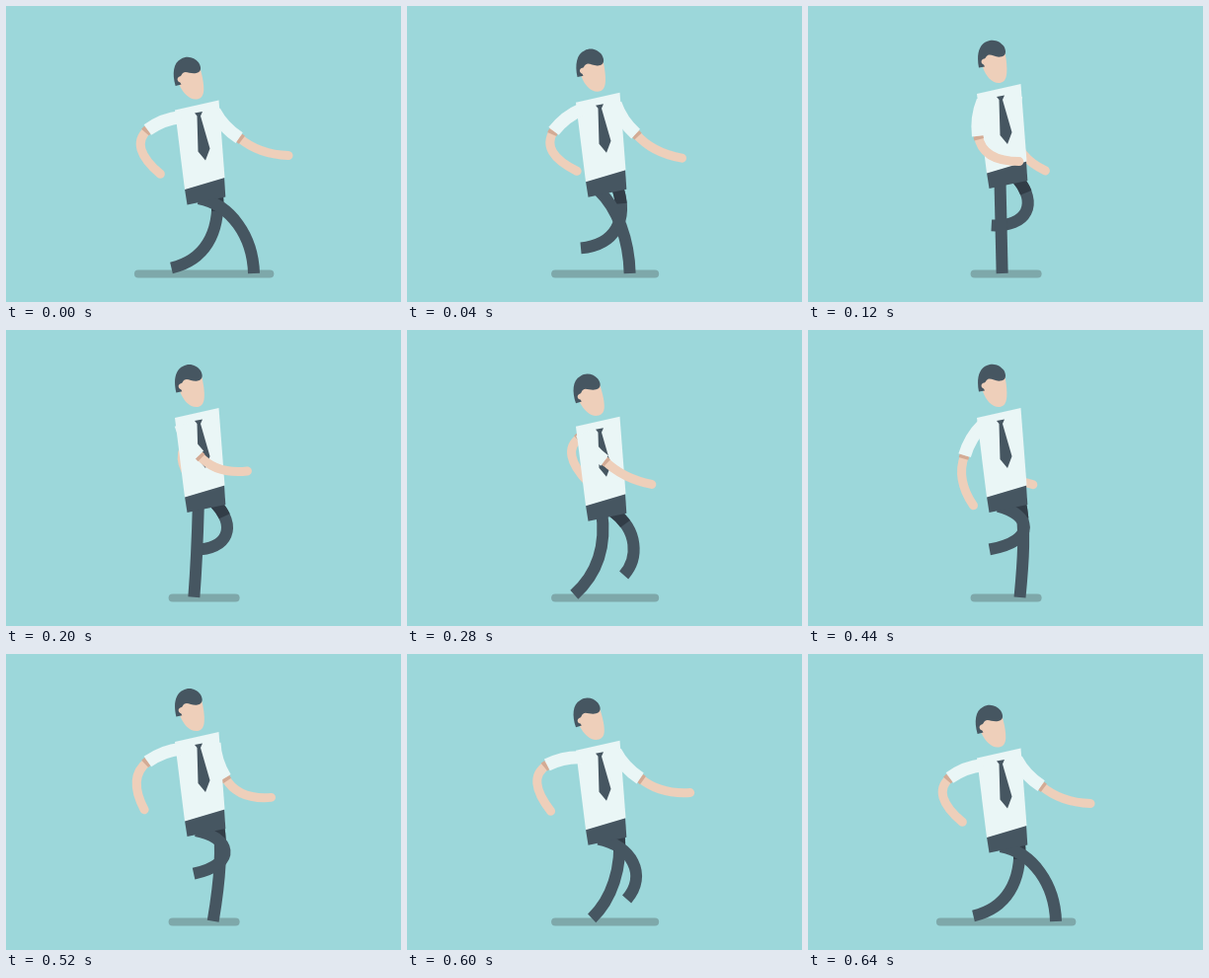
Recreate the animation shown at these times as an HTML page. Size 400 by 300 pixels, loop 680 ms.

```html
<!DOCTYPE html>
<html lang="en">
<head>
<meta charset="utf-8">
<title>Walking man</title>
<style>
  html, body { margin: 0; width: 100%; height: 100%; overflow: hidden; background: #9cd7da; }
  svg { display: block; width: 100%; height: 100%; }
  path { fill: none; }
  .leg { stroke: #465661; stroke-width: 12; }
  .shade { stroke: #323d47; stroke-width: 12; stroke-dasharray: 18 999; }
  .sleeve { stroke: #eaf6f6; stroke-width: 13; }
  .skin { stroke: #eecfba; stroke-width: 9; stroke-linecap: round; }
  .cuff { stroke: #d3ab95; stroke-width: 10; stroke-dasharray: 3.5 999; }
  .dark { fill: #465661; }
  .face { fill: #eecfba; }
  .shirt { fill: #eaf6f6; }
</style>
</head>
<body>
<svg viewBox="0 0 400 300">
  <rect width="400" height="300" fill="#9cd7da"/>
  <rect id="shadow" y="267.5" height="8" rx="4" fill="#7ea8aa"/>
  <path id="farLeg" class="leg"/>
  <path id="farShade" class="shade"/>
  <path id="nearLeg" class="leg"/>
  <g id="body">
    <g id="farArm"></g>
    <path class="dark" d="M181 169L221 157L222.3 177L183.5 185Z"/>
    <path class="shirt" d="M171 89L215.5 79L221.5 157.5L181 169.5Z"/>
    <path class="dark" d="M191 92L199 90.5L197 95L206.5 128L202 140L194.5 131L193.5 95Z"/>
    <g id="head">
      <path class="face" d="M177 50L199 45C201 54 202 64 201 70C200 76 197 78 193 78C186 78 180 71 177 62Z"/>
      <circle class="face" cx="178" cy="56.5" r="3.2"/>
      <path class="dark" d="M173 62.5C170.500 50 173 39 181 36C188 32.500 195 36 198.500 41C201.500 47 200 51 195 51.500C190 52.500 185 48 182 50C180 51 180 53.500 178 53.500C174.500 54.500 175 58.500 178 59.500L179 61.500Z"/>
    </g>
    <g id="nearArm"></g>
  </g>
</svg>
<script>
const STEP = 40, LOOP = 680, CYCLE = 640, QUARTER = CYCLE / 4;
const $ = id => document.getElementById(id);
const wave = (t, peak, period) => Math.cos(2 * Math.PI * (t - peak) / period);

// 1 when both feet are apart on the ground, 0 when the legs pass.
function spread(t) {
  const u = t % (2 * QUARTER);
  return (1 - Math.min(u, 2 * QUARTER - u) / QUARTER) ** 2;
}

// Each pose: hip, two bend points, foot.
const nearLeg = {
  reach: [195, 195, 228, 201, 250, 234, 251, 271],
  stand: [194.5, 178, 193, 209, 192.5, 240, 193, 271],
  push: [199, 187, 209, 223, 195, 251, 151, 266],
  lift: [192, 178, 226, 184, 236, 211, 186, 219.5]
};
const farLeg = {
  reach: [206, 192, 234, 207, 243, 239, 245, 271],
  stand: [215, 172, 220, 197, 216, 238, 212.5, 271],
  push: [214, 190, 217, 232, 200, 258, 167.5, 265.5],
  lift: [211, 173, 235, 198, 223.5, 222, 187, 219.5]
};

function legPath(leg, t) {
  const phase = t % CYCLE, w = spread(t);
  const planted = phase < 2 * QUARTER;
  const ahead = phase < QUARTER || phase >= 3 * QUARTER;
  const wide = ahead ? leg.reach : leg.push;
  const close = planted ? leg.stand : leg.lift;
  const p = close.map((v, i) => v + w * (wide[i] - v));
  return `M${p.slice(0, 2)}C${p.slice(2)}`;
}

// Angles are in degrees from straight down, forwards positive.
function polar([x, y], angle, length) {
  const a = angle * Math.PI / 180;
  return [x + length * Math.sin(a), y + length * Math.cos(a)];
}

function makeArm(id, { shoulder, length, upper, fore }) {
  const [skin, cuff, sleeve] = ["skin", "cuff", "sleeve"].map(name => {
    const p = document.createElementNS("http://www.w3.org/2000/svg", "path");
    p.setAttribute("class", name);
    return $(id).appendChild(p);
  });
  const swing = (s, t) => s.mid + s.amp * wave(t, s.peak, CYCLE);
  return t => {
    const a = swing(upper, t), b = swing(fore, t), bend = b - a;
    const wrist = polar(shoulder, a, length);
    const elbow = polar(wrist, a + bend / 4, 26);
    const hand = polar(wrist, b, 56 - 0.11 * bend);
    const d = `M${wrist}Q${elbow} ${hand}`;
    skin.setAttribute("d", d);
    cuff.setAttribute("d", d);
    sleeve.setAttribute("d", `M${shoulder}Q${polar(shoulder, a - 15, length / 2)} ${wrist}`);
  };
}

const drawNearArm = makeArm("nearArm", {
  shoulder: [177, 96], length: 36,
  upper: { mid: -19, amp: 60, peak: 260 },
  fore: { mid: 34, amp: 38, peak: 210 }
});
const drawFarArm = makeArm("farArm", {
  shoulder: [211, 90], length: 37,
  upper: { mid: -16, amp: 60, peak: 620 },
  fore: { mid: 42, amp: 32, peak: 590 }
});

function draw(t) {
  const w = spread(t);
  const half = 33.7 + 37 * w;
  const tilt = -2 * (1 + wave(t, 275, CYCLE / 2)) ** 2;
  $("shadow").setAttribute("x", 200.6 - half);
  $("shadow").setAttribute("width", half * 2);
  $("body").setAttribute("transform", `translate(0 ${17.5 * w - 1})`);
  $("head").setAttribute("transform", `rotate(${tilt} 193 78)`);
  $("nearLeg").setAttribute("d", legPath(nearLeg, t));
  const far = legPath(farLeg, t + CYCLE / 2);
  $("farLeg").setAttribute("d", far);
  $("farShade").setAttribute("d", far);
  drawNearArm(t);
  drawFarArm(t);
}

const start = performance.now();
function tick(now) {
  const t = Math.max(0, now - start) % LOOP;
  draw(Math.floor(t / STEP) * STEP);
  requestAnimationFrame(tick);
}
draw(0);
requestAnimationFrame(tick);
</script>
</body>
</html>
```
